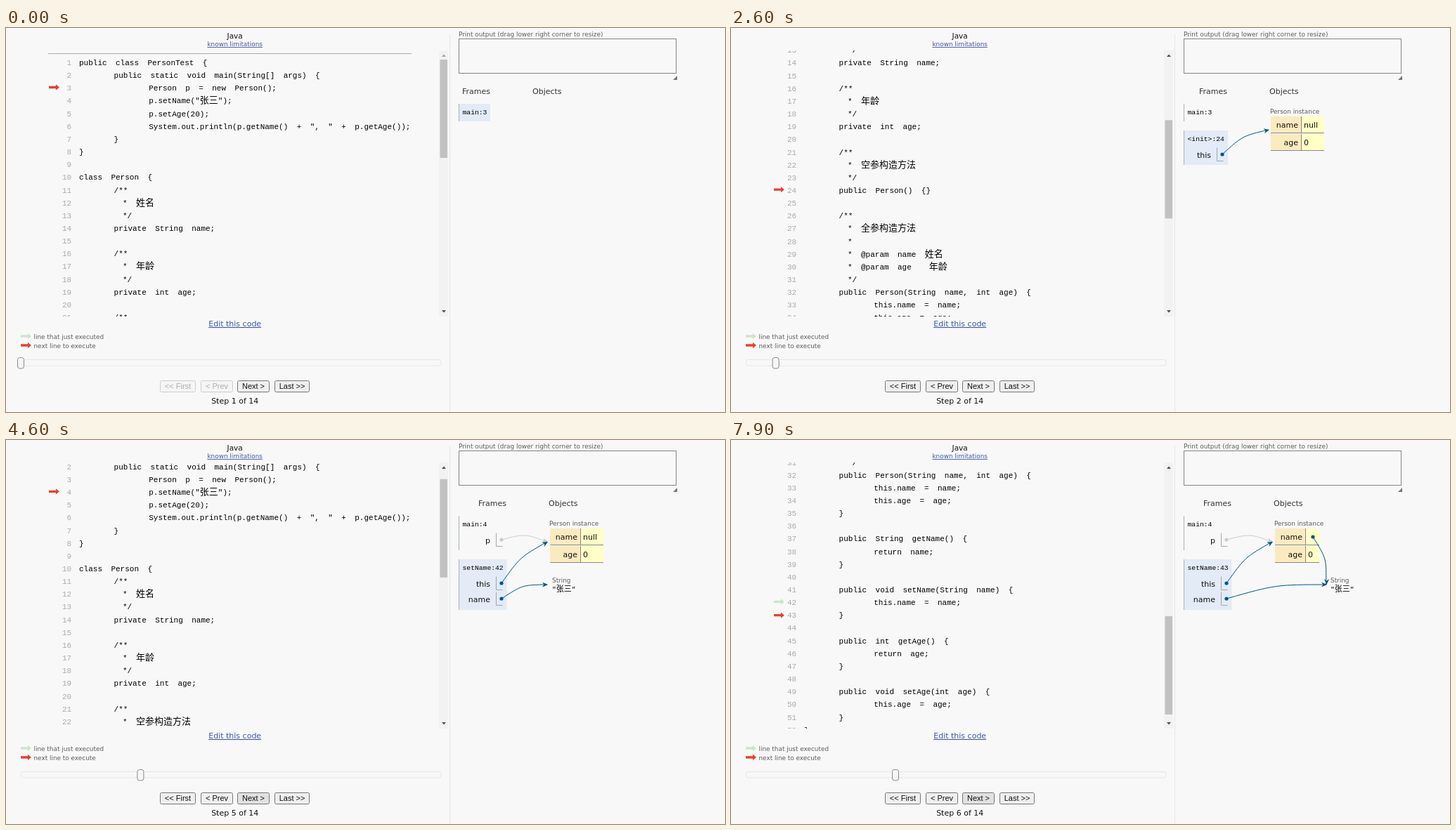
An HTML page for the animation above (8000 ms loop, 1023x547 px).

```html
<!DOCTYPE html>
<html lang="en">
<head>
<meta charset="utf-8">
<title>Java step-through</title>
<style>
  html, body { margin: 0; height: 100%; overflow: hidden; background: #f8f8f8; }
  svg { display: block; width: 100%; height: 100%; }
  text { font: 11px "DejaVu Sans", sans-serif; fill: #111; }
  .small { font-size: 8.9px; fill: #5c5c5c; }
  .head { fill: #333; }
  .link { fill: #3d58a2; text-decoration: underline; }
  .mid { text-anchor: middle; }
  .right { text-anchor: end; }
  .btn { font: 11px "Liberation Sans", sans-serif; text-anchor: middle; }
  .code, .mono { font: 11px "Liberation Mono", "Noto Sans CJK SC", monospace; fill: #000; }
  .code { word-spacing: 5.8px; }
  .mono { font-size: 9.7px; }
  .num { fill: #aaa; }
  .han { font-family: "Noto Sans CJK SC", sans-serif; font-size: 13px; font-weight: 300; }
  .mono .han { font-size: 11px; }
</style>
</head>
<body>
<svg id="stage" viewBox="0 0 1023 547"></svg>
<script>
const source = `public class PersonTest {
    public static void main(String[] args) {
        Person p = new Person();
        p.setName("张三");
        p.setAge(20);
        System.out.println(p.getName() + ", " + p.getAge());
    }
}

class Person {
    /**
     * 姓名
     */
    private String name;

    /**
     * 年龄
     */
    private int age;

    /**
     * 空参构造方法
     */
    public Person() {}

    /**
     * 全参构造方法
     *
     * @param name 姓名
     * @param age  年龄
     */
    public Person(String name, int age) {
        this.name = name;
        this.age = age;
    }

    public String getName() {
        return name;
    }

    public void setName(String name) {
        this.name = name;
    }

    public int getAge() {
        return age;
    }

    public void setAge(int age) {
        this.age = age;
    }
}`;

const LOOP = 8000, ROW = 18.15, MAX_SCROLL = 562;
const RED = '#e93f34', GREEN = '#c9e6ca', BLUE = '#005583', PALE = '#cccccc';

const steps = [
  { at: 0, line: 3, scroll: 0, view: 0 },
  { at: 1300, line: 24, scroll: 235.5, view: 1, scrollAt: 1377, arrowAt: 1382 },
  { at: 2800, line: 24, dy: 4, prev: 24, prevDy: -1, scroll: 235.5, view: 1, scrollAt: 2850, arrowAt: 2960 },
  { at: 3500, line: 4, prev: 24, scroll: 0, view: 2, scrollAt: 3558, arrowAt: 3735 },
  { at: 4500, line: 42, prev: 4, scroll: MAX_SCROLL, view: 3, scrollAt: 4557, arrowAt: 4746 },
  { at: 7500, line: 43, dy: 2, prev: 42, scroll: MAX_SCROLL, view: 4, scrollAt: 7550, arrowAt: 7705 },
];

// Drawing helpers, each returning SVG markup
const text = (x, y, s, cls = '') => `<text x="${x}" y="${y}" class="${cls}">${
  s.replace(/</g, '&lt;').replace(/ /g, '\u00a0')
   .replace(/[\u4e00-\u9fff]+/g, '<tspan class="han">$&</tspan>')}</text>`;
const rect = (x, y, w, h, fill, more = '') =>
  `<rect x="${x}" y="${y}" width="${w}" height="${h}" fill="${fill}" ${more}/>`;
const line = (d, color) => `<path d="${d}" fill="none" stroke="${color}"/>`;
const arrow = (fill, id, x, y) =>
  `<g id="${id}" transform="translate(${x} ${y})"><path d="M0 3H12V0L18 5 12 10V7H0z" fill="${fill}" transform="scale(.83) translate(0 -5)"/></g>`;

const button = (x, w, label, id = '') => `<g id="${id}">${
  rect(x, 502.5, w, 16, '#efefef', 'rx="2" stroke="#767676"')}${text(x + w / 2, 514, label, 'btn')}</g>`;

// Both Bezier handles share one point, 10 px off the middle of the chord
function connector(x1, y1, x2, y2, color = BLUE) {
  const dx = x2 - x1, dy = y2 - y1, k = 10 / Math.hypot(dx, dy);
  const cx = (x1 + x2) / 2 + dy * k, cy = (y1 + y2) / 2 - dx * k;
  const angle = Math.atan2(y2 - cy, x2 - cx) * 180 / Math.PI;
  return line(`M${x1} ${y1}C${cx} ${cy} ${cx} ${cy} ${x2 - 1} ${y2}`, color) +
    `<circle cx="${x1}" cy="${y1}" r="2.6" fill="${color}"/>` +
    `<path d="M0 0L-8 -3.6 -5.5 0 -8 3.6z" fill="${color}" transform="translate(${x2} ${y2}) rotate(${angle})"/>`;
}

const headings = x => text(x, 93.5, 'Frames', 'head') + text(x + 100, 93.5, 'Objects', 'head');

const frame = (y, w, h, title, active) =>
  (active ? rect(644, y, w, h, '#e2ebf6') : '') +
  line(`M644.5 ${y}v${h}`, '#a6b3b6') + text(649.5, y + 15, title, 'mono');

const variable = (x, y, name) =>
  text(x - 16, y + 5, name, 'right') + line(`M${x - 7.5} ${y - 9.5}v19h9`, '#a0a8ac');

function person(x, nameValue, w = 32) {
  const row = (y, key, value) =>
    rect(x + 1, y, 43, 24, '#faebbf') + rect(x + 45, y, w, 24, '#ffffc6') +
    line(`M${x + 44.5} ${y}v24M${x + 1} ${y + 23.5}h${44 + w}`, '#888') +
    text(x + 40, y + 16, key, 'right') + text(x + 48, y + 16, value);
  return text(x, 122, 'Person instance', 'small') + row(126, 'name', nameValue) + row(151, 'age', '0');
}

const string = x => text(x, 203, 'String', 'small') + text(x, 216, '"张三"', 'mono');

const setNameFrames = n => headings(672) +
  frame(108, 68, 49, 'main:4') + variable(705, 142, 'p') +
  frame(170, 68.5, 72, 'setName:' + n, true) + variable(705, 204, 'this') + variable(705, 226, 'name');
const personLinks = connector(705, 142, 771, 145, PALE) + connector(705, 204, 771, 145);

const views = [
  headings(649) + frame(108, 45, 25, 'main:3', true),
  headings(666) + frame(108, 45, 25, 'main:3') +
    frame(146, 63, 49, '<init>:24', true) + variable(699, 180, 'this') +
    person(767, 'null') + connector(699, 180, 766, 145),
  headings(649) + frame(108, 45, 49, 'main:4', true) + variable(682, 142, 'p') +
    person(750, 'null') + connector(682, 142, 748, 145),
  setNameFrames(42) + person(773, 'null') + string(777) +
    personLinks + connector(705, 226, 771, 206),
  setNameFrames(43) + person(773, '', 19) + string(853) +
    personLinks + connector(705, 226, 848, 206) + connector(828, 138, 847.5, 206),
];

const listing = source.split('\n').map((s, i) => {
  const y = 53 + i * ROW;
  return text(93.2, y, String(i + 1), 'code num right') + text(104, y, s, 'code');
}).join('');

document.getElementById('stage').innerHTML =
  '<clipPath id="pane"><rect x="0" y="32" width="616" height="379"/></clipPath>' +
  rect(0, 0, 1023, 547, '#f8f8f8') +
  line('M631.5 9V547', '#e6e6e6') +
  text(325.7, 15, 'Java', 'mid').replace('<text', '<text style="font-size:10.5px"') +
  text(325.7, 26, 'known limitations', 'small link mid') +
  `<g clip-path="url(#pane)"><g id="scroller">${line('M60 36.5H577', '#aaa')}${listing}
   ${arrow(GREEN, 'prevArrow', 61, 0)}${arrow(RED, 'curArrow', 61, 0)}</g></g>` +
  rect(616, 32, 13, 379, '#f2f2f2') + rect(617.5, 45, 10.5, 140, '#c1c1c1', 'id="thumb"') +
  '<path id="up" d="M620 41h6l-3 -3.5z"/><path d="M620 402h6l-3 3.5z" fill="#505050"/>' +
  text(325.7, 425, 'Edit this code', 'link mid') +
  arrow(GREEN, 'legendPrev', 21, 439) + text(39.5, 443, 'line that just executed', 'small') +
  arrow(RED, 'legendNext', 21, 452) + text(39.5, 456, 'next line to execute', 'small') +
  rect(21.5, 472.5, 597.5, 8.5, '#f8f8f8', 'rx="3" stroke="#e6e6e6"') +
  rect(0, 469.5, 9, 15.5, '#f6f6f6', 'id="handle" rx="3" stroke="#888"') +
  button(219.5, 50, '<< First', 'first') + button(277.5, 45, '< Prev', 'back') +
  button(329.5, 45, 'Next >', 'next') + button(382.5, 49, 'Last >>') +
  '<text id="label" x="325.7" y="535" class="mid"></text>' +
  text(644, 11.5, 'Print output (drag lower right corner to resize)', 'small') +
  rect(644.5, 15.5, 309, 49, '#f8f8f8', 'stroke="#858585"') +
  '<path d="M949 74h6v-6z" fill="#777"/>' +
  views.map((v, i) => `<g id="view${i}">${v}</g>`).join('');

const $ = id => document.getElementById(id);
const set = (id, attrs) => { for (const k in attrs) $(id).setAttribute(k, attrs[k]); };
const clamp = p => Math.min(1, Math.max(0, p));
const mix = (a, b, p) => a + (b - a) * p;
const swing = p => 0.5 - Math.cos(p * Math.PI) / 2;
const cubic = p => p < 0.5 ? 4 * p ** 3 : 1 - 4 * (1 - p) ** 3;
const lineY = (n, dy = 0) => 84.5 + (n - 3) * ROW + dy;

function render(t) {
  const index = steps.findLastIndex(s => t >= s.at);
  const step = steps[index], before = steps[index - 1] || step;
  const scroll = index ? mix(before.scroll, step.scroll, swing(clamp((t - step.scrollAt) / 300))) : 0;
  const moved = index ? cubic(clamp((t - step.arrowAt) / 250)) : 1;

  set('scroller', { transform: `translate(0 ${-scroll})` });
  set('thumb', { y: 45 + scroll * 206 / MAX_SCROLL });
  set('up', { fill: scroll > 0 ? '#505050' : '#a3a3a3' });
  set('curArrow', { transform: `translate(61 ${mix(lineY(before.line, before.dy), lineY(step.line, step.dy), moved)})` });

  // The pale arrow fades out, then reappears as the red one sets off
  const settled = !index || t >= step.arrowAt;
  const owner = settled ? step : before;
  set('prevArrow', {
    transform: `translate(61 ${lineY(owner.prev || 0, owner.prevDy)})`,
    opacity: !owner.prev ? 0 : settled ? 1 : clamp((step.arrowAt - t) / 200),
  });

  set('handle', { x: 16.5 + index * 42.6 });
  $('label').textContent = `Step ${index + 1} of 14`;
  const hovered = t >= 800 && t < 2600 || t >= 2800;
  $('next').firstChild.setAttribute('fill', hovered ? '#e1e1e1' : '#efefef');
  set('first', { opacity: index ? 1 : 0.32 });
  set('back', { opacity: index ? 1 : 0.32 });
  views.forEach((_, i) => set('view' + i, { display: i === step.view ? 'inline' : 'none' }));
}

(function tick() {
  render(performance.now() % LOOP);
  requestAnimationFrame(tick);
})();
</script>
</body>
</html>
```
